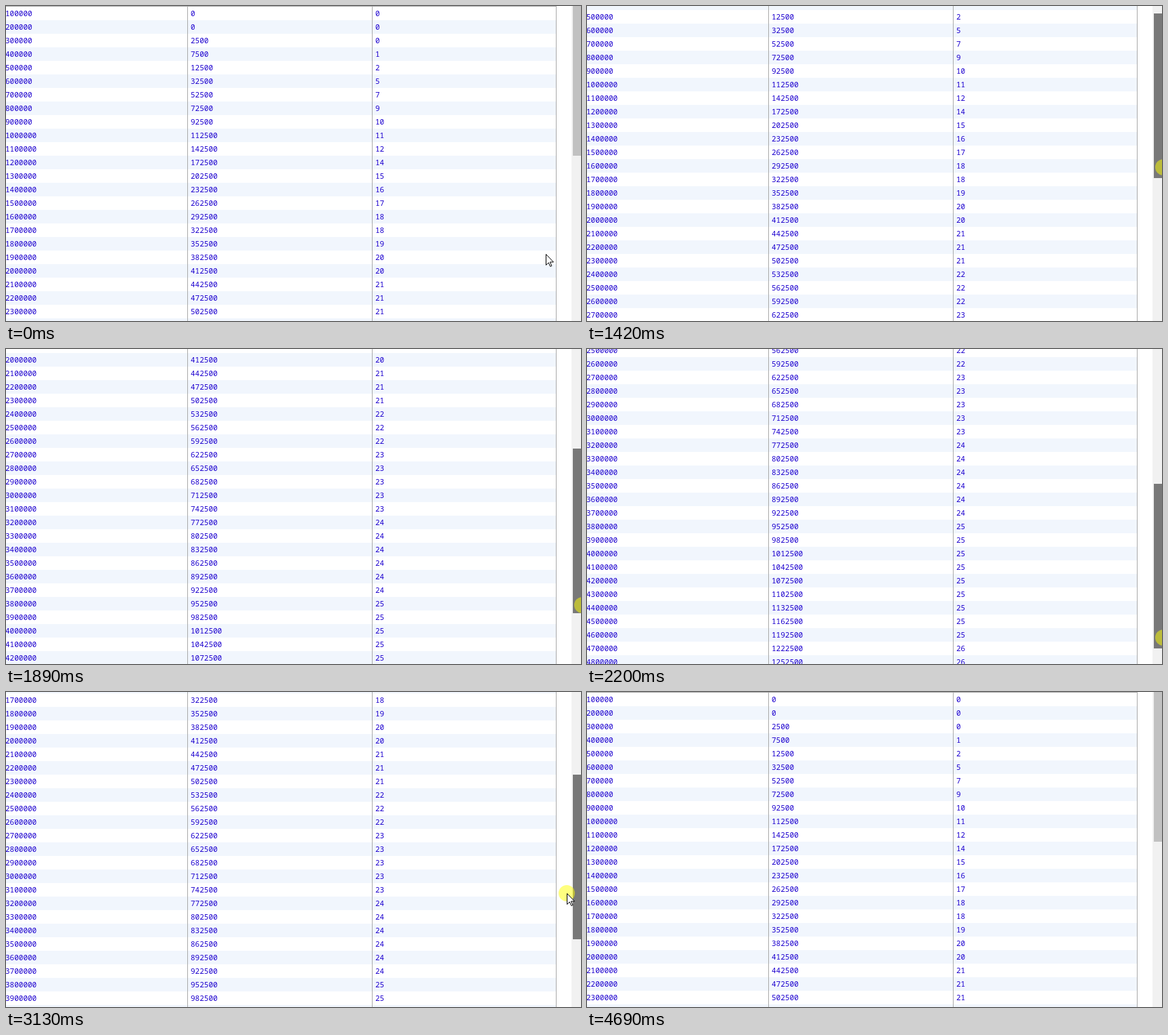
An HTML page that plays this animation: 847x465 px, repeating every 5.1 s.

```html
<!DOCTYPE html>
<html lang="en">
<head>
<meta charset="utf-8">
<title>Scrolling tax table</title>
<style>
  html, body { margin: 0; width: 100%; height: 100%; overflow: hidden; background: #fff; }
  #stage { position: relative; width: 847px; height: 465px; overflow: hidden; }
  #stage * { position: absolute; box-sizing: border-box; }
  #table { left: 0; top: 0; width: 811px; border-top: 1px solid #aaa; }
  .row { left: 0; width: 810px; height: 20px; }
  .row:nth-child(even) { background: #f1f6fd; }
  .row span {
    top: 0; white-space: pre; color: #1c00cf;
    font: 300 11px/20px "Noto Sans Mono", "DejaVu Sans Mono", monospace;
  }
  .row span:nth-child(1) { left: -1px; }
  .row span:nth-child(2) { left: 272px; }
  .row span:nth-child(3) { left: 544px; }
  .rule { top: 0; width: 1px; height: 465px; background: #aaa; }
  #track { left: 833px; top: 0; width: 14px; height: 465px; background: #f1f1f1; }
  #thumb { left: 835px; top: 0; width: 12px; height: 243px; }
  #halo { left: -12px; top: -12px; width: 24px; height: 24px; border-radius: 50%; background: rgba(255, 255, 0, .5); }
  #pointer { left: 0; top: 0; width: 0; height: 0; }
  #pointer svg { left: 0; top: 0; overflow: visible; }
</style>
</head>
<body>
<div id="stage">
  <div id="table"></div>
  <div class="rule" style="left:267px"></div>
  <div class="rule" style="left:539px"></div>
  <div class="rule" style="left:810px"></div>
  <div id="track"></div>
  <div id="thumb"></div>
  <div id="pointer">
    <div id="halo"></div>
    <svg width="12" height="20">
      <path d="M.5 .5V16.5L4.2 12.9L6.8 18.5L8.9 17.6L6.4 12H11.5Z" fill="#fff" stroke="#000"/>
    </svg>
  </div>
</div>
<script>
const LOOP = 5100;
const STEP = 78, FIRST = 84;           // screen refresh interval and first refresh
const PRESS = 940, RELEASE = 3820;
const SCROLL_PER_PX = 2.212, THUMB_TOP = -22;

// Key points: time, then values
const pointerPath = curve([
  [0, 795, 366], [580, 839, 207], [730, 841, 204], [1200, 841, 204],
  [1410, 849, 238], [1878, 849, 378], [2190, 849, 426], [2600, 849, 453],
  [2980, 849, 453], [3126, 826, 297], [3520, 824, 142], [4050, 824, 142],
  [4608, 814, 449], [4686, 814, 490]
]);
const scrollPath = curve([
  [1200, 0], [1410, 75], [1878, 375], [2190, 489], [2600, 551],
  [2980, 551], [3126, 319], [3440, 0]
]);

// Smooth curve through the keys that never overshoots them
function curve(keys) {
  const last = keys.length - 1;
  const slope = (i, c) => (keys[i + 1][c] - keys[i][c]) / (keys[i + 1][0] - keys[i][0]);
  const tangent = (i, c) => {
    if (i === 0 || i === last) return 0;
    const a = slope(i - 1, c), b = slope(i, c);
    return a * b > 0 ? 2 * a * b / (a + b) : 0;
  };
  return time => {
    const t = Math.min(Math.max(time, keys[0][0]), keys[last][0]);
    const i = Math.max(0, keys.findIndex(k => k[0] >= t) - 1);
    const span = keys[i + 1][0] - keys[i][0], p = (t - keys[i][0]) / span, q = 1 - p;
    return keys[i].slice(1).map((from, j) => {
      const c = j + 1;
      return Math.round(
        q * q * (1 + 2 * p) * from + p * p * (3 - 2 * p) * keys[i + 1][c] +
        span * p * q * (q * tangent(i, c) - p * tangent(i + 1, c)));
    });
  };
}

function tax(income) {
  const part = (from, to, rate) => Math.max(0, Math.min(income, to) - from) * rate;
  return Math.round(part(250000, 500000, .05) + part(500000, 1000000, .2) + part(1000000, Infinity, .3));
}

const $ = id => document.getElementById(id);
const table = $("table"), thumb = $("thumb"), pointer = $("pointer"), halo = $("halo");

table.innerHTML = Array.from({ length: 60 }, (_, i) => {
  const income = (i + 1) * 100000, due = tax(income);
  const cells = [income, due, Math.floor(due * 100 / income)];
  return `<div class="row" style="top:${i * 20}px">${cells.map(c => `<span>${c}</span>`).join("")}</div>`;
}).join("");

function draw(now) {
  const time = now % LOOP;
  const t = time < FIRST ? 0 : FIRST + STEP * Math.floor((time - FIRST) / STEP);
  const [x, y] = pointerPath(t), [scroll] = scrollPath(t);
  const pressed = t >= PRESS && t < RELEASE;
  const top = Math.floor(scroll / SCROLL_PER_PX) + THUMB_TOP;
  table.style.transform = `translateY(${-scroll}px)`;
  thumb.style.transform = `translateY(${top}px)`;
  thumb.style.background = pressed ? "#787878" : x >= 833 ? "#a8a8a8" : "#c1c1c1";
  pointer.style.transform = `translate(${x}px, ${y}px)`;
  halo.style.display = pressed ? "block" : "none";
}

const start = performance.now();
function loop() {
  draw(performance.now() - start);
  requestAnimationFrame(loop);
}
loop();
</script>
</body>
</html>
```
